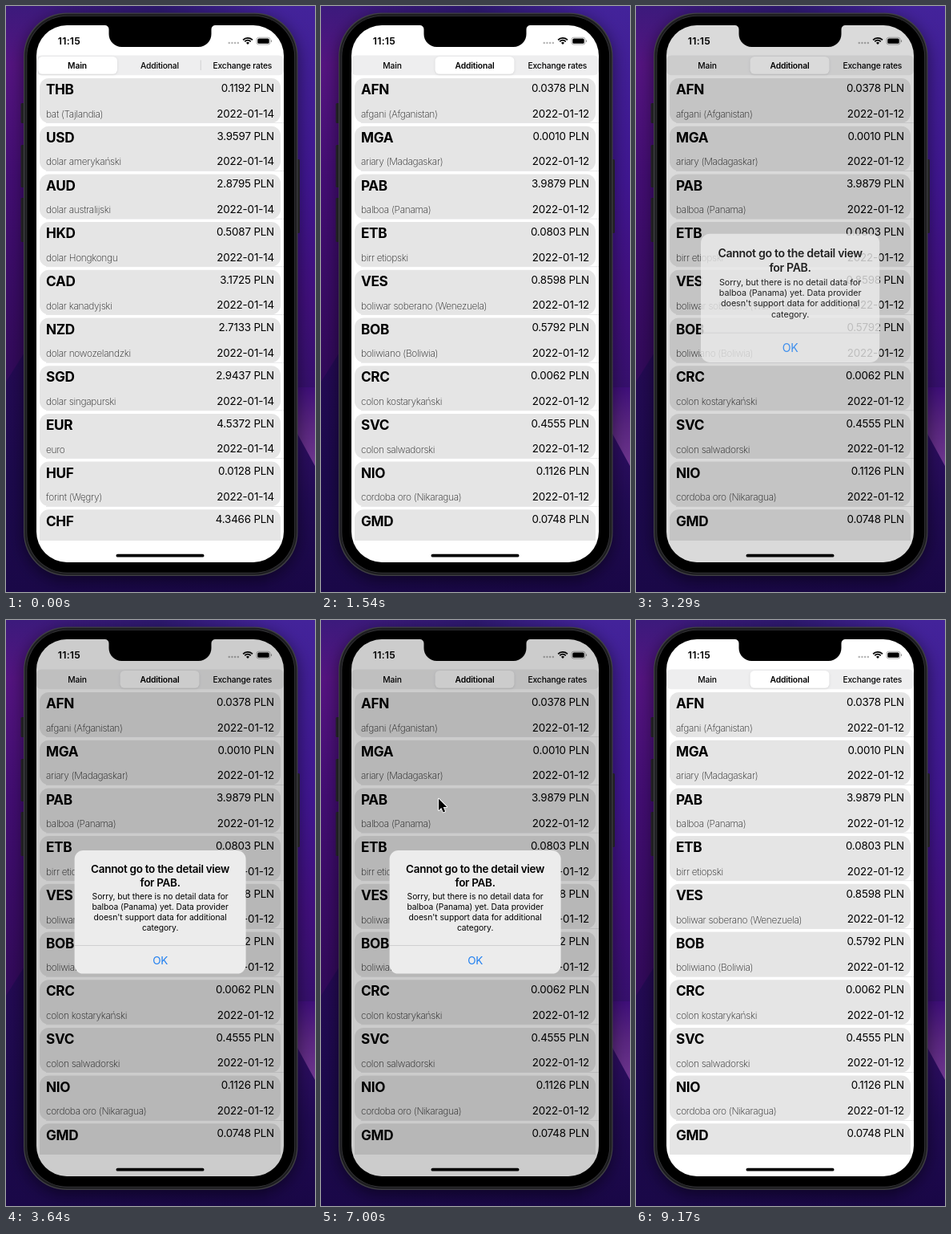
Animation of 386x730 px, one loop 9870 ms. Source, as an HTML page with a canvas:

```html
<!DOCTYPE html>
<html lang="en">
<head>
<meta charset="utf-8">
<title>Currency list</title>
<style>
html, body { margin: 0; width: 100%; height: 100%; overflow: hidden; background: #1c0a50; }
canvas { display: block; width: 386px; height: 730px; }
</style>
</head>
<body>
<canvas id="stage"></canvas>
<script>
const W = 386, H = 730, LOOP = 9870, STEP = 70;
const FONT = 'Inter, "Noto Sans", sans-serif';
const SCREEN = { x: 38, y: 24, w: 309, h: 669, r: 38 };
const LIST = { top: 87, bottom: 666, first: 90, pitch: 59.7, card: 55.6 };

const canvas = document.getElementById('stage');
const ctx = canvas.getContext('2d');
const dpr = window.devicePixelRatio || 1;
canvas.width = W * dpr;
canvas.height = H * dpr;

const main = {
  date: '2022-01-14',
  rows: [
    ['THB', 'bat (Tajlandia)', '0.1192'],
    ['USD', 'dolar amerykański', '3.9597'],
    ['AUD', 'dolar australijski', '2.8795'],
    ['HKD', 'dolar Hongkongu', '0.5087'],
    ['CAD', 'dolar kanadyjski', '3.1725'],
    ['NZD', 'dolar nowozelandzki', '2.7133'],
    ['SGD', 'dolar singapurski', '2.9437'],
    ['EUR', 'euro', '4.5372'],
    ['HUF', 'forint (Węgry)', '0.0128'],
    ['CHF', 'frank szwajcarski', '4.3466']
  ]
};
const additional = {
  date: '2022-01-12',
  rows: [
    ['AFN', 'afgani (Afganistan)', '0.0378'],
    ['MGA', 'ariary (Madagaskar)', '0.0010'],
    ['PAB', 'balboa (Panama)', '3.9879'],
    ['ETB', 'birr etiopski', '0.0803'],
    ['VES', 'boliwar soberano (Wenezuela)', '0.8598'],
    ['BOB', 'boliwiano (Boliwia)', '0.5792'],
    ['CRC', 'colon kostarykański', '0.0062'],
    ['SVC', 'colon salwadorski', '0.4555'],
    ['NIO', 'cordoba oro (Nikaragua)', '0.1126'],
    ['GMD', 'dalasi (Gambia)', '0.0748']
  ]
};

const clamp = v => Math.max(0, Math.min(1, v));
const smooth = v => { v = clamp(v); return v * v * (3 - 2 * v); };
const spring = (ms, rate) => {
  const x = Math.max(0, ms) * rate;
  return 1 - (1 + x) * Math.exp(-x);
};

function box(x, y, w, h, r, fill) {
  ctx.beginPath();
  ctx.roundRect(x, y, w, h, r);
  ctx.fillStyle = fill;
  ctx.fill();
}

function poly(points, fill) {
  ctx.beginPath();
  points.forEach(([x, y]) => ctx.lineTo(x, y));
  ctx.closePath();
  ctx.fillStyle = fill;
  ctx.fill();
}

function text(str, x, y, size, weight, spacing, color = '#000', align = 'left') {
  ctx.font = `${weight} ${size}px ${FONT}`;
  ctx.letterSpacing = spacing + 'px';
  ctx.textAlign = align;
  ctx.fillStyle = color;
  ctx.fillText(str, x, y);
}

function gradient(x0, y0, x1, y1, ...stops) {
  const g = ctx.createLinearGradient(x0, y0, x1, y1);
  stops.forEach(([at, color]) => g.addColorStop(at, color));
  return g;
}

function fillArea(x, y, w, h, fill) {
  ctx.fillStyle = fill;
  ctx.fillRect(x, y, w, h);
}

function drawBackdrop() {
  const low = '#1a0848', lowRight = '#190746';
  fillArea(0, 0, W, H / 2, gradient(60, 0, 326, 0,
    [0, '#3c1a7c'], [0.5, '#2e1970'], [1, '#43239a']));
  fillArea(0, H / 2, W, H / 2, gradient(60, 0, 326, 0, [0, low], [1, lowRight]));
  fillArea(0, 0, 60, H, gradient(0, 0, 0, H,
    [0, '#3c1a7c'], [0.1, '#541480'], [0.3, '#420d72'], [0.6, '#330a5c'], [1, low]));
  fillArea(326, 0, 60, H, gradient(0, 0, 0, H,
    [0, '#43239a'], [0.3, '#3f1690'], [0.5, '#400f7c'], [0.68, '#34106a'], [0.85, '#200a52'], [1, lowRight]));
  poly([[0, 468], [40, 405], [60, 420], [60, H], [0, H]],
    gradient(0, 440, 0, H, [0, '#240a54'], [0.5, '#1c094c'], [1, low]));
  poly([[345, 475], [W, 475], [W, 573], [345, 498]],
    gradient(0, 475, 0, 573, [0, '#3f0f7a'], [0.45, '#57247f'], [1, '#6f378f']));
}

function drawPhone() {
  const metal = '#29292c';
  box(18.5, 121, 6, 25, 1.5, metal);
  box(18.5, 173, 6, 53, 1.5, metal);
  box(18.5, 239, 6, 55, 1.5, metal);
  box(361, 191, 6, 92, 1.5, metal);
  ctx.save();
  ctx.shadowColor = 'rgba(0,0,0,.5)';
  ctx.shadowBlur = 20 * dpr;
  ctx.shadowOffsetY = 5 * dpr;
  box(22, 8.5, 342.5, 701.5, 54, '#414145');
  ctx.restore();
  box(23.2, 9.7, 340.1, 699.1, 53, '#1d1d20');
  box(25.5, 12, 335.5, 694.5, 51, '#39393c');
  box(26.3, 12.8, 333.9, 692.9, 50, '#000');
}

function drawNotch() {
  const left = 128.5, right = 256.5, top = 24, bottom = 51, flare = 5, r = 16;
  ctx.beginPath();
  ctx.moveTo(left - flare, top - 1);
  ctx.lineTo(left - flare, top);
  ctx.arcTo(left, top, left, top + flare, flare);
  ctx.arcTo(left, bottom, left + r, bottom, r);
  ctx.arcTo(right, bottom, right, bottom - r, r);
  ctx.arcTo(right, top, right + flare, top, flare);
  ctx.lineTo(right + flare, top - 1);
  ctx.fillStyle = '#000';
  ctx.fill();
}

function drawStatus() {
  text('11:15', 64.8, 48, 12.3, 600, 0.25);
  for (let i = 0; i < 4; i++) box(277.5 + i * 3.7, 44.8, 2.5, 2.5, 1.25, '#b5b5b5');
  ctx.strokeStyle = '#000';
  ctx.lineWidth = 1.8;
  [8, 5.1].forEach(r => {
    ctx.beginPath();
    ctx.arc(302, 47.8, r, -Math.PI * 0.76, -Math.PI * 0.24);
    ctx.stroke();
  });
  poly([[299.9, 45.7], [302, 44.8], [304.1, 45.7], [302, 47.9]], '#000');
  ctx.beginPath();
  ctx.roundRect(313, 39.2, 17, 8.8, 2.6);
  ctx.strokeStyle = '#9a9a9a';
  ctx.lineWidth = 0.8;
  ctx.stroke();
  box(314.3, 40.5, 14.4, 6.2, 1.5, '#000');
  box(331, 42.2, 1.1, 2.8, 0.6, '#9a9a9a');
}

function drawTabs(p) {
  box(38, 61.5, 309, 24.7, 6, '#eeeeef');
  fillArea(242.8, 67.5, 0.8, 12.5, `rgba(60,60,67,${0.2 * (1 - p)})`);
  ctx.save();
  ctx.shadowColor = 'rgba(0,0,0,.12)';
  ctx.shadowBlur = 2.5 * dpr;
  ctx.shadowOffsetY = 0.8 * dpr;
  box(40 + 102.5 * p, 63, 99, 21.8, 5.5, '#fff');
  ctx.restore();
  const label = (s, x, on) => text(s, x, 77.6, 10.3, on ? 600 : 500, -0.15, '#000', 'center');
  label('Main', 89, p < 0.5);
  label('Additional', 192, p >= 0.5);
  label('Exchange rates', 295.3, false);
}

function drawPage(page, dx) {
  if (Math.abs(dx) >= SCREEN.w) return;
  page.rows.forEach(([code, name, rate], i) => {
    const y = LIST.first + i * LIST.pitch;
    fillArea(50 + dx, y + LIST.card - 0.2, 297, 0.6, '#d9d9db');
    box(42 + dx, y, 301, LIST.card, 11.5, '#e5e5e5');
    text(code, 50 + dx, y + 20.2, 17.2, 700, -0.35);
    text(rate + ' PLN', 335 + dx, y + 16.8, 13.4, 400, -0.2, '#000', 'right');
    text(name, 50 + dx, y + 48.7, 11.9, 200, -0.3, '#222');
    text(page.date, 335 + dx, y + 48.5, 13.4, 400, -0.15, '#000', 'right');
  });
}

function drawAlert(visible, scale) {
  const cx = 192.6, cy = 363.8;
  const line = (s, y, size, weight, spacing, color) =>
    text(s, cx, y, size, weight, spacing, color, 'center');
  ctx.save();
  ctx.translate(cx, cy);
  ctx.scale(scale, scale);
  ctx.translate(-cx, -cy);
  ctx.globalAlpha = Math.pow(visible, 0.7);
  box(85.6, 287, 214, 153.6, 11, '#ececec');
  fillArea(85.6, 405, 214, 0.8, '#c9c9ca');
  ctx.globalAlpha = Math.sqrt(visible);
  line('Cannot go to the detail view', 315.3, 13.5, 600, -0.3);
  line('for PAB.', 332.3, 13.5, 600, -0.3);
  [
    'Sorry, but there is no detail data for',
    'balboa (Panama) yet. Data provider',
    "doesn't support data for additional",
    'category.'
  ].forEach((s, i) => line(s, 348.3 + i * 12.85, 10.3, 400, -0.05));
  line('OK', 428.5, 13.5, 400, -0.3, '#1f7ff0');
  ctx.restore();
}

function drawCursor(x, y) {
  ctx.save();
  ctx.translate(x, y);
  ctx.beginPath();
  [[0, 0], [0, 14.3], [3.3, 11.2], [5.7, 16.8], [8.1, 15.8], [5.7, 10.4], [10.2, 10.2]]
    .forEach(([px, py]) => ctx.lineTo(px, py));
  ctx.closePath();
  ctx.lineJoin = 'round';
  ctx.lineWidth = 1.8;
  ctx.strokeStyle = '#fff';
  ctx.stroke();
  ctx.fillStyle = '#000';
  ctx.fill();
  ctx.restore();
}

function draw(t) {
  ctx.setTransform(dpr, 0, 0, dpr, 0, 0);
  drawBackdrop();
  drawPhone();

  const slide = t >= 1540 ? 1 : spring(t - 800, 0.012);
  const thumb = t >= 1540 ? 1 : spring(t - 800, 0.014);
  const shown = t >= 3640 ? 1 : spring(t - 3190, 0.026);
  const hidden = smooth((t - 8800) / 350);

  ctx.save();
  ctx.beginPath();
  ctx.roundRect(SCREEN.x, SCREEN.y, SCREEN.w, SCREEN.h, SCREEN.r);
  ctx.clip();
  fillArea(SCREEN.x, SCREEN.y, SCREEN.w, SCREEN.h, '#fff');

  ctx.save();
  ctx.beginPath();
  ctx.rect(SCREEN.x, LIST.top, SCREEN.w, LIST.bottom - LIST.top);
  ctx.clip();
  drawPage(main, -SCREEN.w * slide);
  drawPage(additional, SCREEN.w * (1 - slide));
  ctx.restore();

  drawTabs(thumb);
  drawStatus();
  const visible = shown * (1 - hidden);
  fillArea(SCREEN.x, SCREEN.y, SCREEN.w, SCREEN.h, `rgba(0,0,0,${0.2 * visible})`);
  if (visible > 0) drawAlert(visible, 1 + 0.16 * (1 - shown));
  box(137.5, 682.8, 110, 3.8, 1.9, '#000');
  ctx.restore();
  drawNotch();

  if (t >= 4690 && t < 7070) drawCursor(147, t >= 5250 && t < 7000 ? 222 : 222.7);
  if (t >= 8540 && t < 9030) drawCursor(167.3, 423.5);
}

const start = performance.now();
function frame() {
  const t = (performance.now() - start) % LOOP;
  draw(Math.floor(t / STEP) * STEP);
  requestAnimationFrame(frame);
}
frame();
</script>
</body>
</html>
```
